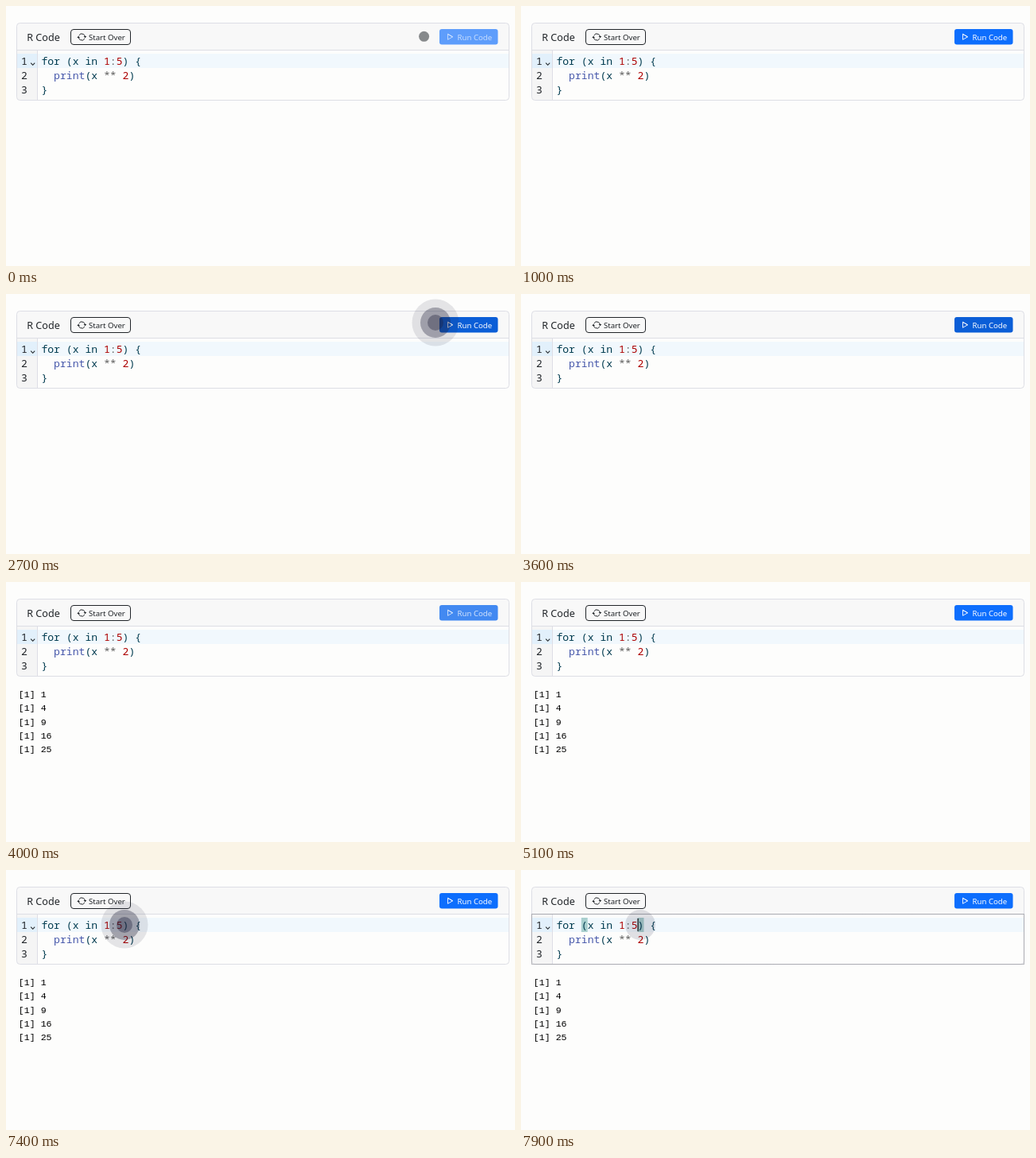
Animation, 640 px wide and 327 px high, one loop 8000 ms. Source, as an HTML page with a canvas:

```html
<!DOCTYPE html>
<html lang="en">
<head>
<meta charset="utf-8">
<title>R code cell</title>
<style>
  html, body { margin: 0; width: 100%; height: 100%; overflow: hidden; background: #fdfdfc; }
  canvas { display: block; width: 640px; height: 327px; }
</style>
</head>
<body>
<canvas id="stage"></canvas>
<script>
const W = 640, H = 327, LOOP = 8000, STEP = 100;
const canvas = document.getElementById('stage');
const ctx = canvas.getContext('2d');
const dpr = window.devicePixelRatio || 1;
canvas.width = W * dpr;
canvas.height = H * dpr;

const SANS = '"Noto Sans", sans-serif';
const CODE = '13.1px "Noto Sans Mono", monospace';
const OUTPUT = '11.6px "Liberation Mono", monospace';
const CHAR = 7.86, CODE_X = 44.4, LINE = 18, CODE_TOP = 60;

const PAPER = '#fdfdfc', EDGE = '#dddee5', DARK = '#212529', SHADE = 'rgb(30,30,55)';
const KEY = '#003b4f', FUNC = '#4758ab', NUM = '#ad0000', OP = '#5e5e5e';
const LINES = [
  [['for', KEY], [' (x ', KEY], ['in ', KEY], ['1', NUM], [':', OP], ['5', NUM], [') {', KEY]],
  [['  print', FUNC], ['(x ', KEY], ['** ', OP], ['2', NUM], [')', KEY]],
  [['}', KEY]]
];

const CLICKS = [
  { at: 2700, lead: 700, from: [560, -15], to: [540, 36], drift: [2, 1] },
  { at: 7400, lead: 800, from: [620, 226], to: [149, 69], drift: [1, 0] }
];

const clamp = v => Math.max(0, Math.min(1, v));
const ramp = (t, start, length) => clamp((t - start) / length);
const mix = (a, b, k) => a + (b - a) * k;
const ease = k => k * k * (3 - 2 * k);

function text(str, x, y, font, color) {
  ctx.font = font;
  ctx.fillStyle = color;
  ctx.fillText(str, x, y);
}

function box(x, y, w, h, r) {
  ctx.beginPath();
  ctx.roundRect(x, y, w, h, r);
}

function disc(x, y, r, color, alpha) {
  if (r <= 0 || alpha <= 0) return;
  ctx.globalAlpha = alpha;
  ctx.fillStyle = color;
  ctx.beginPath();
  ctx.arc(x, y, r, 0, Math.PI * 2);
  ctx.fill();
  ctx.globalAlpha = 1;
}

function polyline(points, color, width) {
  ctx.beginPath();
  points.forEach(([x, y]) => ctx.lineTo(x, y));
  ctx.strokeStyle = color;
  ctx.lineWidth = width;
  ctx.stroke();
}

function repeatIcon(x, y) {
  for (const turn of [0, Math.PI]) {
    ctx.save();
    ctx.translate(x, y);
    ctx.rotate(turn);
    ctx.beginPath();
    ctx.arc(0, 0, 4.1, Math.PI * 1.15, Math.PI * 1.93);
    ctx.strokeStyle = DARK;
    ctx.lineWidth = 1;
    ctx.stroke();
    ctx.beginPath();
    ctx.moveTo(2.3, -0.9);
    ctx.lineTo(6, -0.9);
    ctx.lineTo(4.2, 1.3);
    ctx.fillStyle = DARK;
    ctx.fill();
    ctx.restore();
  }
}

function drawCard() {
  ctx.save();
  box(13.5, 21.5, 619, 97, 4);
  ctx.clip();
  ctx.fillStyle = '#f8f8f8';
  ctx.fillRect(13, 21, 620, 34);
  ctx.fillStyle = '#f5f5f5';
  ctx.fillRect(13, 56, 26, 63);
  ctx.fillStyle = '#f1f8fd';
  ctx.fillRect(40, CODE_TOP, 593, LINE);
  ctx.fillStyle = '#e2f0fb';
  ctx.fillRect(13, CODE_TOP, 26, LINE);
  ctx.restore();

  ctx.fillStyle = EDGE;
  ctx.fillRect(39, 56, 1, 62);
  ctx.fillRect(13, 55, 620, 1);
  box(13.5, 21.5, 619, 97, 4);
  ctx.strokeStyle = EDGE;
  ctx.lineWidth = 1;
  ctx.stroke();
}

function drawHeader() {
  text('R Code', 26.2, 43.5, '12.6px ' + SANS, DARK);
  box(81.5, 29.5, 75, 19, 3.5);
  ctx.strokeStyle = DARK;
  ctx.lineWidth = 1;
  ctx.stroke();
  repeatIcon(95.3, 39);
  text('Start Over', 104, 42.5, '9.6px ' + SANS, DARK);
}

function drawRunButton(t) {
  const busy = t < 1000 ? 1 : ramp(t, 3600, 150) - ramp(t, 3950, 150);
  const hover = (ramp(t, 2400, 150) - ramp(t, 4950, 150)) * (1 - busy);
  const rgb = [[13, 11], [110, 94], [253, 215]].map(([a, b]) => Math.round(mix(a, b, hover)));
  ctx.globalAlpha = 1 - 0.35 * busy;
  ctx.fillStyle = `rgb(${rgb})`;
  box(545, 29, 73.5, 19.5, 3);
  ctx.fill();
  polyline([[555.5, 35.3], [561.6, 38.8], [555.5, 42.3], [555.5, 35.3], [561.6, 38.8]], '#fff', 0.9);
  text('Run Code', 567.6, 42.5, '9.6px ' + SANS, '#fff');
  ctx.globalAlpha = 1;
}

// The dot grows for half a period, then fades at full size.
function drawSpinner(t) {
  let phase;
  if (t < 1000) phase = (t / 750 + 0.735) % 1;
  else if (t >= 3600 && t < 4000) phase = (t - 3600) / 750;
  else return;
  const grow = clamp(phase * 2);
  disc(525.6, 38.3, 6.5 * grow, DARK, phase < 0.5 ? grow : 2 - phase * 2);
}

function drawCode(focused) {
  if (focused) {
    ctx.fillStyle = 'rgba(50,140,130,.38)';
    for (const col of [4, 13]) ctx.fillRect(CODE_X + col * CHAR, CODE_TOP, CHAR, LINE);
  }
  LINES.forEach((tokens, row) => {
    const y = 74 + row * LINE;
    let x = CODE_X;
    text(String(row + 1), 18.9, y, CODE, DARK);
    for (const [str, color] of tokens) {
      text(str, x, y, CODE, color);
      x += str.length * CHAR;
    }
  });
  polyline([[31.2, 71.7], [33.7, 74.3], [36.2, 71.7]], DARK, 1.1);
  if (!focused) return;
  ctx.fillStyle = '#111';
  ctx.fillRect(146.5, 61, 1.2, 16);
  ctx.setLineDash([1, 1]);
  ctx.strokeStyle = '#77777f';
  ctx.lineWidth = 1;
  ctx.strokeRect(13.5, 55.5, 619, 63);
  ctx.setLineDash([]);
}

function drawOutput() {
  for (let n = 1; n <= 5; n++) {
    text(`[1] ${n * n}`, 15.8, 145 + (n - 1) * 17.25, OUTPUT, '#000');
  }
}

// A pale pointer disc travels in; pressing adds a wide ring and a dark core.
function drawPointer(t, click) {
  const e = t - click.at;
  if (e < -click.lead || e >= 600) return;
  const travel = ease(ramp(e, -click.lead, click.lead - 150));
  const settle = ramp(e, 0, 200);
  const [x, y] = [0, 1].map(i => mix(click.from[i], click.to[i], travel) + click.drift[i] * settle);
  const press = ramp(e, -200, 200);
  const release = 1 - ramp(e, 50, 400);
  disc(x, y, 29.5 * press, SHADE, 0.11 * release);
  disc(x, y, 19, SHADE, 0.13);
  disc(x, y, 19 * press, SHADE, 0.23 * release);
  disc(x, y, 10 * press, SHADE, 0.36 * release);
}

function draw(t) {
  ctx.setTransform(dpr, 0, 0, dpr, 0, 0);
  ctx.fillStyle = PAPER;
  ctx.fillRect(0, 0, W, H);
  drawCard();
  drawHeader();
  drawRunButton(t);
  drawSpinner(t);
  drawCode(t >= 7500);
  if (t >= 4000) drawOutput();
  CLICKS.forEach(click => drawPointer(t, click));
}

const begin = performance.now();
function tick() {
  const t = (performance.now() - begin) % LOOP;
  draw(Math.floor(t / STEP) * STEP);
  requestAnimationFrame(tick);
}
tick();
</script>
</body>
</html>
```
